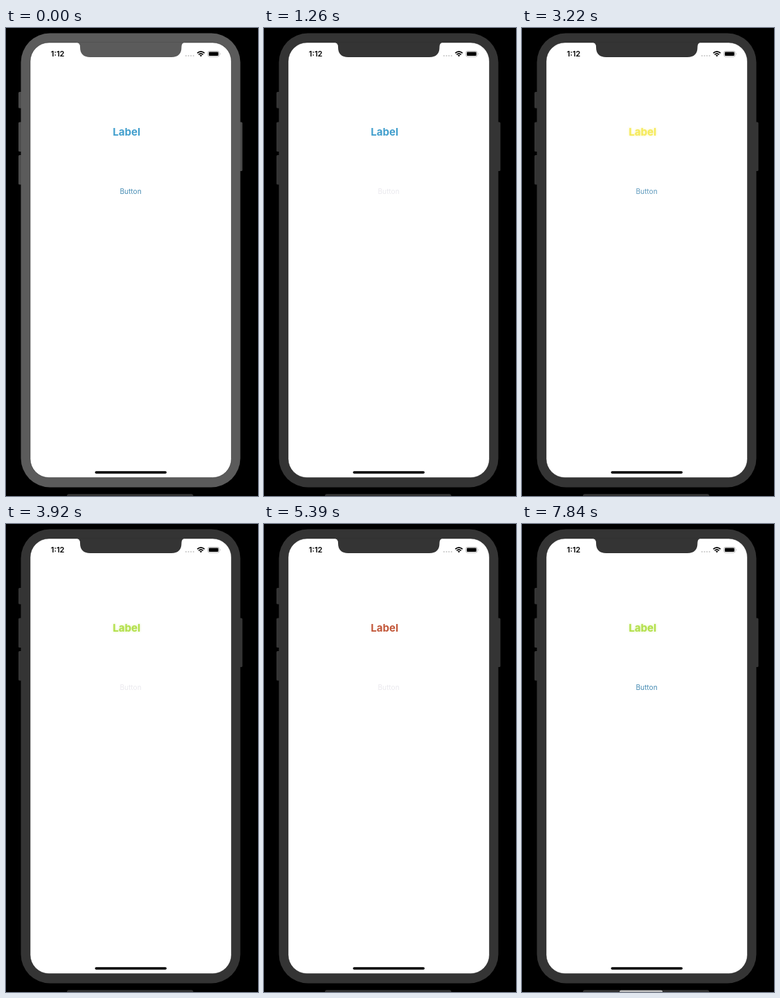
Recreate the animation shown at these times as an HTML page. Size 364 by 674 pixels, loop 8.19 s.

```html
<!DOCTYPE html>
<html lang="en">
<head>
<meta charset="utf-8">
<title>Label and button</title>
<style>
  html, body { margin: 0; width: 100%; height: 100%; overflow: hidden; background: #000; }
  svg { display: block; width: 364px; height: 674px; }
  text { font-family: Inter, "Liberation Sans", Arial, sans-serif; }
  #time { font-size: 11px; font-weight: 600; }
  #label { font-size: 15px; font-weight: 700; }
  #button { font-size: 10.1px; }
</style>
</head>
<body>
<svg viewBox="0 0 364 674">
  <g id="keys">
    <rect x="18" y="92" width="6" height="23.5" rx="1.5"/>
    <rect x="18" y="135.5" width="6" height="42.5" rx="1.5"/>
    <rect x="18" y="183" width="6" height="42.5" rx="1.5"/>
    <rect x="336" y="135.5" width="5.5" height="70.5" rx="1.5"/>
  </g>
  <rect id="body" x="21.5" y="7.5" width="317" height="654" rx="42"/>
  <rect x="35" y="21" width="290.5" height="626.5" rx="27" fill="#fff" stroke="#1c1c1c" stroke-opacity=".6" stroke-width=".8"/>
  <path id="notch" d="M101 20.5Q107 21 107 27.5Q107 42 121.500 42H239Q253.500 42 253.500 27.5Q253.500 21 259.500 20.500Z"/>

  <text id="time" x="64.800" y="41">1:12</text>
  <g fill="#c9c9c9">
    <circle cx="260" cy="40" r="1.100"/>
    <circle cx="263.600" cy="40" r="1.100"/>
    <circle cx="267.200" cy="40" r="1.100"/>
    <circle cx="270.800" cy="40" r="1.100"/>
  </g>
  <g fill="none" stroke="#000" stroke-width="1.700">
    <path d="M276.300 36.200Q281.500 31.400 286.700 36.200"/>
    <path d="M278.300 38.300Q281.500 35.500 284.700 38.300"/>
  </g>
  <path d="M279.700 39.500Q281.500 38.100 283.300 39.500L281.500 41.300Z"/>
  <rect x="291.700" y="33.400" width="16.200" height="7.800" rx="2.200" fill="#fff" stroke="#a5a5a5" stroke-width=".8"/>
  <rect x="292.900" y="34.600" width="13.800" height="5.400" rx="1.200"/>
  <path d="M309 36Q310.300 37.300 309 38.600Z" fill="#999"/>

  <text id="label" x="154.300" y="155">Label</text>
  <text id="button" x="164.500" y="239">Button</text>
  <rect x="128.500" y="638.300" width="103.500" height="3.400" rx="1.700"/>

  <rect x="88" y="671" width="182.500" height="8" rx="3" fill="#303030"/>
  <rect id="grip" x="141" y="671.500" width="62" height="8" rx="2" fill="#bdbdbd"/>
</svg>
<script>
const LOOP = 8190, TICK = 70;
const COLORS = ['#429fcd', '#8a5bb0', '#c25739', '#e3a63c', '#f5ea5c', '#b3e04b', '#4fbfae'];
const GLOWS = [0, 0, 0, .35, .75, .6, 0];
const PALE = [234, 233, 238], BLUE = [72, 141, 180];

// How far the button has recovered, per tick after release
const QUICK = [.12, .5, .85, 1], LATE = [0, 0, .5, .85, 1], HELD = [.12, .85, .85, 1];
// Each tap: tick pressed, tick released, recovery
const TAPS = [
  [18, 21, QUICK], [26, 28, LATE], [34, 36, QUICK], [41, 44, QUICK],
  [49, 52, QUICK], [56, 58, QUICK], [62, 64, QUICK], [69, 71, QUICK],
  [75, 77, LATE], [83, 84, QUICK], [88, 89, HELD], [106, 108, QUICK]
];
const BODY = ['#5b5b5b', '#4a4a4a', '#3c3c3c', '#343434'];
const KEYS = ['#4b4b4b', '#424242', '#3a3a3a', '#353535'];

const $ = id => document.getElementById(id);
const body = $('body'), notch = $('notch'), keys = $('keys');
const label = $('label'), button = $('button'), grip = $('grip');

function buttonLevel(tick) {
  const tap = TAPS.filter(t => t[0] <= tick).pop();
  if (!tap) return 1;
  const [, up, ramp] = tap;
  return tick < up ? 0 : ramp[Math.min(tick - up, ramp.length - 1)];
}

function draw(ms) {
  const tick = Math.floor(ms / TICK);
  const shade = Math.min(tick, 3);
  body.style.fill = notch.style.fill = BODY[shade];
  keys.style.fill = KEYS[shade];

  const hue = TAPS.filter(t => t[1] <= tick).length % COLORS.length;
  label.style.fill = COLORS[hue];
  const alpha = Math.round(GLOWS[hue] * 255).toString(16).padStart(2, '0');
  label.style.textShadow = GLOWS[hue] ? `0 0 3px ${COLORS[hue]}${alpha}` : 'none';

  const level = buttonLevel(tick);
  button.style.fill = `rgb(${PALE.map((p, i) => Math.round(p + (BLUE[i] - p) * level))})`;
  grip.style.visibility = tick >= 112 ? 'visible' : 'hidden';
}

const start = performance.now();
function frame() {
  draw((performance.now() - start) % LOOP);
  requestAnimationFrame(frame);
}
frame();
</script>
</body>
</html>
```
